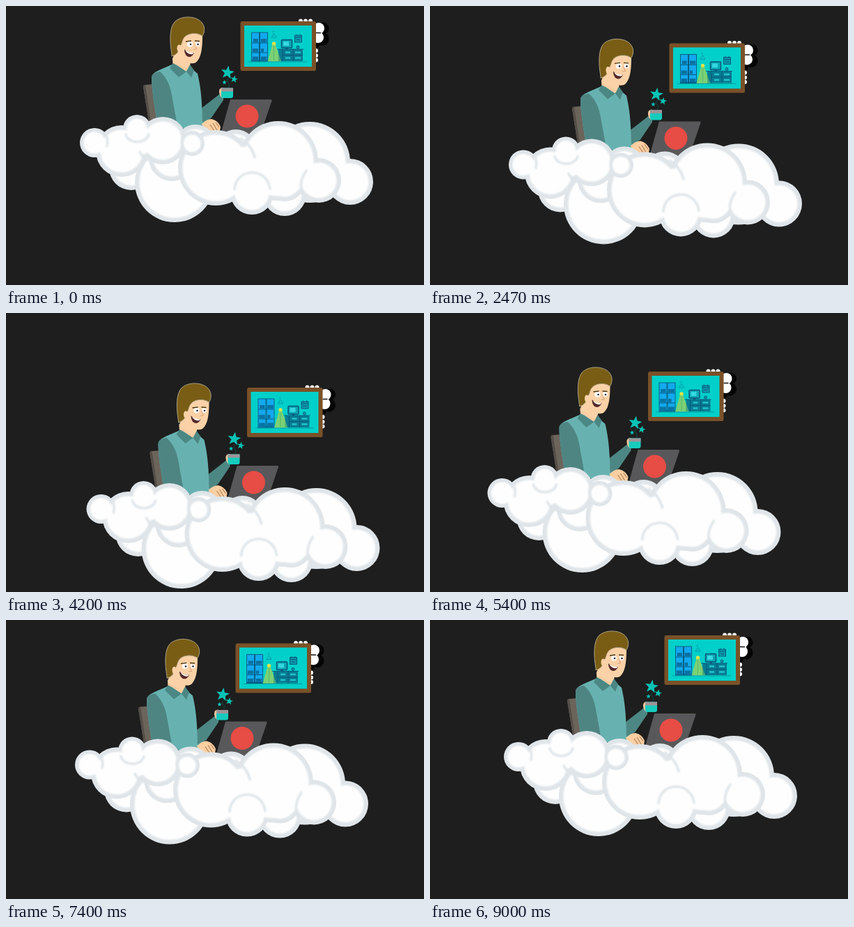
An HTML page that plays this animation: 600x400 px, repeating every 9070 ms.

```html
<!DOCTYPE html>
<html lang="en">
<head>
<meta charset="utf-8">
<title>Working in the cloud</title>
<style>
html, body { margin: 0; width: 100%; height: 100%; overflow: hidden; background: #1e1e1e; }
svg { display: block; width: 100vw; height: 100vh; }
</style>
</head>
<body>
<svg viewBox="0 0 600 400">
  <defs>
    <filter id="soft" x="-10%" y="-10%" width="120%" height="120%">
      <feGaussianBlur stdDeviation="1.3"/>
    </filter>
  </defs>
  <rect width="600" height="400" fill="#1e1e1e"/>
  <g id="scene">
    <!-- decoration behind the wall picture -->
    <g id="bumps"></g>

    <!-- wall picture -->
    <rect x="336.5" y="22" width="108.5" height="71" rx="2.5" fill="#7a5128"/>
    <rect x="342" y="28" width="97" height="59" fill="#00d0c9"/>
    <g id="office" stroke-width=".9" stroke="#07547a" fill="none">
      <path d="M348 80H432" stroke="#078f9c"/>
      <rect x="352.5" y="38" width="11" height="41" fill="#12a9ee"/>
      <rect x="364.5" y="38" width="11" height="41" fill="#12a9ee"/>
      <path d="M353 53H375M353 67H375M353 78H375"/>
      <path d="M355 49.500H362M366 49.500H374M354 63.500H362M366 63.500H370M354 75H362M366 75H374" stroke-width="5" stroke-dasharray="1.6 .6" stroke="#075f86"/>
      <path d="M381 45L384.500 39L388 45ZM382 37.500L385 36"  stroke="#07809c" stroke-width=".7"/>
      <path d="M382.500 55H386.500L395 79.500H375.500Z" fill="#63c98a" stroke="none"/>
      <path d="M384.500 57V78" stroke="#1d9078"/>
      <circle cx="384.500" cy="54" r="2.700" fill="#e3e34a" stroke="none"/>
      <rect x="395.500" y="48.500" width="15" height="11.500" rx="1" fill="#0ba7b4" stroke-width="1.5"/>
      <rect x="398" y="51" width="8" height="6" fill="#35d8df" stroke="none"/>
      <path d="M403 60V63" stroke-width="3"/>
      <rect x="391" y="62" width="35" height="17" fill="#087c91" stroke="none"/>
      <path d="M389 62H427M397 62V79M412 62V79M397 70.500H426"/>
      <path d="M401 66.500H408M415 66.500H423M401 74.500H408M415 74.500H423" stroke="#21c2cd" stroke-width="2.500"/>
      <rect x="414.500" y="42" width="10" height="10" fill="#0a98ab"/>
      <path d="M414.500 45H424.500M417 40.500V43M422 40.500V43M417 48.500H422"/>
      <circle cx="419" cy="59" r="2" fill="#0a98ab"/>
      <path d="M376 79L382.500 55H386.500L395 79Z" fill="#98db58" fill-opacity=".45" stroke="none"/>
    </g>

    <!-- chair -->
    <path d="M197 116Q197 113 200 113L213 112L220 172H206Z" fill="#6b645b"/>
    <path d="M197 116Q197 113 200 113L209 172H206Z" fill="#544e48"/>

    <!-- far arm, hand and cup -->
    <path d="M280 147L307 126Q313 128 312 135L295 160L281 171Z" fill="#4d8784"/>
    <path d="M312 117Q305 117 306 124Q307 131 312 132Z" fill="#f8c69c"/>
    <path d="M309 117.500H326V129Q326 132 323 132H312Q309 132 309 129Z" fill="#17cbbd"/>
    <path d="M309 117.500H326V122.500H309Z" fill="#9d9498"/>
    <path d="M319 104Q316 108 320 111Q322 114 319 117" fill="none" stroke="#0d4f4c" stroke-width="1"/>
    <g id="stars" fill="#08c3b5"></g>

    <!-- body -->
    <path d="M239 74L263 77L265 98H240Z" fill="#f9cda2"/>
    <path d="M209 103C209 94 224 91 240 83L267 90L275 97C280 118 282 140 282 174H218C214 148 209 121 209 103Z" fill="#67b2b1"/>
    <path d="M209 103C209 97 214 95 221 94C231 103 236 115 238 128L246 172H218C214 148 209 121 209 103Z" fill="#4e8583"/>
    <path d="M239 80L258 94L265 87L263 77Z" fill="#f9cda2"/>
    <path d="M240 82L235 89L248 102L259 94ZM259 94L266 103L270 92L264 84Z" fill="#4b8784"/>
    <path d="M246 163Q265 162 282 166L289 175H246Z" fill="#67b2b1"/>

    <!-- head -->
    <path d="M246 46C259 39 273 37 282 43C282 56 281 70 276 77C273 82 269 83 265 82L260 89L239 78Z" fill="#fbd2a7"/>
    <path d="M238 69C235 53 234 30 243 22C253 13 275 14 282 25C286 31 285 38 282 43C274 37 261 39 256 45C252 50 253 57 249 57C246 54 246 62 247 66Q243 71 238 72Z" fill="#7a5d15" stroke="#b7ad91" stroke-width=".9"/>
    <ellipse cx="248.500" cy="60.500" rx="3" ry="5" fill="#fbd2a7"/>
    <circle cx="264" cy="54.500" r="4" fill="#fff"/>
    <circle cx="275" cy="54.500" r="3.500" fill="#fff"/>
    <circle cx="265" cy="55" r="1.300" fill="#222"/>
    <circle cx="275.500" cy="55" r="1.300" fill="#222"/>
    <path d="M258 51L266 50M271 50L278 50.500" stroke="#4b3712" stroke-width="1.300"/>
    <path d="M271 55L273.500 62L269 62.500" fill="none" stroke="#d79b72" stroke-width=".9"/>
    <path d="M256 62C256 74 266 77 270 67C265 68 260 67 256 62Z" fill="#54282a"/>
    <path d="M257.500 64Q263 68 269.500 67L268 69Q261 70 257.500 64Z" fill="#fff"/>

    <!-- laptop and near hand -->
    <path d="M322 134H380Q382 134 381.500 136L365 184H308Z" fill="#58585a"/>
    <circle cx="346" cy="158" r="16.500" fill="#e74c45"/>
    <path d="M281 169Q288 162 295 162Q304 164 308 173L307 179H285Z" fill="#fbcfa1"/>
    <path d="M293 170L299 179M297 168L303 178M301 167L306 174" fill="none" stroke="#9c6a47" stroke-width="1"/>

    <g id="clouds"></g>
  </g>
</svg>
<script>
const NS = 'http://www.w3.org/2000/svg';
const $ = id => document.getElementById(id);

function add(parent, tag, attrs) {
  const el = document.createElementNS(NS, tag);
  for (const k in attrs) el.setAttribute(k, attrs[k]);
  return parent.appendChild(el);
}
const dot = (parent, cx, cy, r, fill) => add(parent, 'circle', { cx, cy, r, fill });

function star(cx, cy, r, turn) {
  const pts = [];
  for (let i = 0; i < 10; i++) {
    const a = turn + i * Math.PI / 5, d = i % 2 ? r * 0.42 : r;
    pts.push((cx + d * Math.sin(a)).toFixed(1) + ',' + (cy - d * Math.cos(a)).toFixed(1));
  }
  add($('stars'), 'polygon', { points: pts.join(' ') });
}

// A puff group: grey rims, soft white cores, then inner rim strokes.
function cloud(puffs, folds = '') {
  const g = add($('clouds'), 'g', {});
  puffs.forEach(([x, y, r]) => dot(g, x, y, r, '#dfe5e9'));
  const core = add(g, 'g', { filter: 'url(#soft)' });
  puffs.forEach(([x, y, r]) => dot(core, x, y, r - (r > 25 ? 6.5 : 5.5), '#fefefe'));
  if (folds) add(g, 'path', {
    d: folds, fill: 'none', stroke: '#dfe5e9', 'stroke-width': 3.5,
    'stroke-linecap': 'round', filter: 'url(#soft)'
  });
}

const bumps = $('bumps');
[[455, 32, 8.5], [454, 47, 9.5], [446, 56, 4]].forEach(p => dot(bumps, ...p, '#050505'));
[[449, 32, 8], [448, 45, 8], [423, 21.5, 3], [430, 21.5, 3], [437, 21.5, 3],
 [445, 64, 3], [445, 71, 3], [445, 77.5, 3]].forEach(p => dot(bumps, ...p, '#fff'));
add(bumps, 'path', { d: 'M445 38.500H452', stroke: '#111', 'stroke-width': 1.5 });

star(318, 95.5, 10, 0.15);
star(327.5, 105, 5.5, 0.2);
star(313.5, 109.5, 3.5, 0);

cloud([[436, 224, 58], [494, 252, 33]]);
cloud([[272, 200, 30], [330, 207, 30]]);
cloud([[400, 270, 31]]);
cloud([[180, 232, 32]]);
cloud([[242, 253, 57]]);
cloud([[238, 218, 33]]);
cloud([[301, 232, 54], [391, 222, 57], [449, 250, 32], [353, 268, 31], [345, 235, 40], [400, 250, 30]],
  'M337 190Q353 200 357 217M328 263C330 231 375 231 379 262M424 266Q421 250 431 236');
cloud([[127, 196, 21], [166, 208, 37], [188, 176, 20], [225, 193, 34], [267, 197, 18], [193, 196, 23]],
  'M172 184C175 198 201 199 205 184M143 184Q147 190 145 201M255 205Q250 196 254 187M192 209Q196 218 206 221');

// Drift keys: time in ms, x, y
const keys = [
  [0, 0, 0], [930, 1, 4.6], [1600, 2.5, 13], [2470, 7, 31.5], [2800, 9.4, 40.7],
  [3730, 19, 70.7], [4200, 9.5, 85], [4670, -8.7, 86], [5400, -23.5, 62],
  [5600, -24.3, 54.5], [6530, -16.5, 27], [7400, -7, 11.5], [8400, -0.8, 1.2], [9000, 0, 0]
];
const LOOP = 9070;

function slope(i, c) {
  if (i === 0 || i === keys.length - 1) return 0;
  const a = keys[i - 1], b = keys[i + 1];
  return (b[c] - a[c]) / (b[0] - a[0]);
}

function drift(t, c) {
  if (t >= 9000) return 0;
  const i = keys.findIndex(k => k[0] > t) - 1;
  const a = keys[i], b = keys[i + 1], h = b[0] - a[0], u = (t - a[0]) / h;
  const u2 = u * u, u3 = u2 * u;
  return (2 * u3 - 3 * u2 + 1) * a[c] + (u3 - 2 * u2 + u) * h * slope(i, c)
       + (3 * u2 - 2 * u3) * b[c] + (u3 - u2) * h * slope(i + 1, c);
}

// The motion advances in steps, 15 per second.
function draw(ms) {
  const t = Math.floor((ms % LOOP + 5) * 0.015) / 0.015;
  $('scene').setAttribute('transform', `translate(${drift(t, 1).toFixed(2)} ${drift(t, 2).toFixed(2)})`);
}

const start = performance.now();
function tick() {
  draw(performance.now() - start);
  requestAnimationFrame(tick);
}
tick();
</script>
</body>
</html>
```
